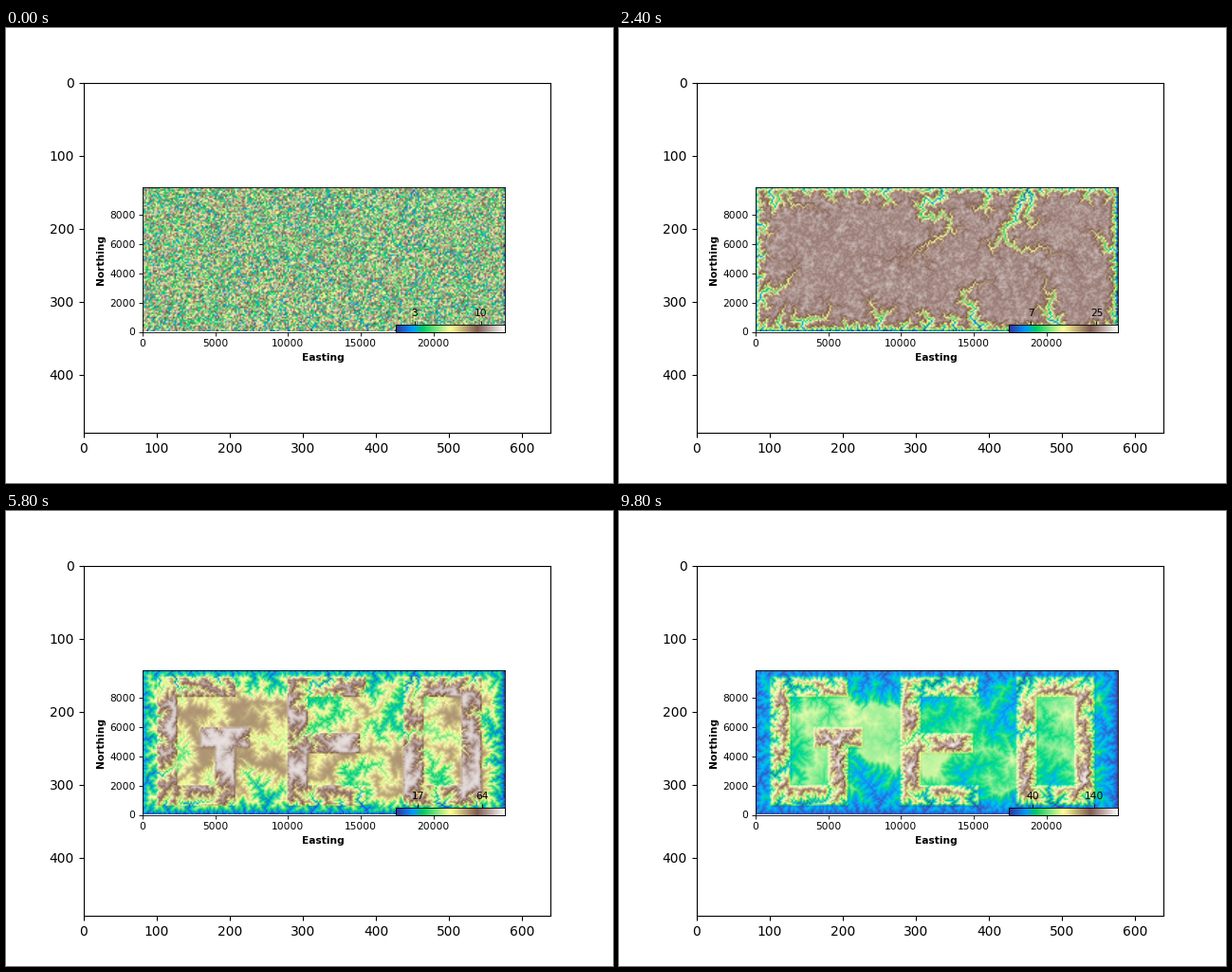
Recreate the animation shown at these times as a matplotlib script. Size 640 by 480 pixels, loop 10000 ms.

```python
import numpy as np
import matplotlib.pyplot as plt
from matplotlib.animation import FuncAnimation
from matplotlib.colors import LightSource

W, H, DPI = 640, 480, 100
ROWS, COLS, CELL = 100, 250, 100
FRAMES, SUBSTEPS = 50, 4
ERODE, UPLIFT, EXTRA, EXTRA_START = 0.17, 1.8, 4.1, 25
SCALE = 0.77
LOW = 1.0
STROKE, BOTTOM, TOP, WIDTH = 14, 6, 95, 54

NODES = np.arange(ROWS * COLS).reshape(ROWS, COLS)


def letter_mask():
    mask = np.zeros((ROWS, COLS), bool)

    def block(left, low, right, up):
        mask[low:up, left:right] = True

    for x in (10, 100, 180):
        block(x, BOTTOM, x + STROKE, TOP)
        block(x, BOTTOM, x + WIDTH, BOTTOM + STROKE)
        block(x, TOP - STROKE, x + WIDTH, TOP)
    block(40, 46, 74, 46 + STROKE)
    block(50, BOTTOM, 50 + STROKE, 60)
    block(100, 42, 150, 42 + STROKE)
    block(220, BOTTOM, 220 + STROKE, TOP)
    return mask


def fill_pits(z):
    """Raise closed hollows to their spill level with a tiny outward slope."""
    w = z.copy()
    inner, floor = w[1:-1, 1:-1], z[1:-1, 1:-1]
    inner[:] = 1e6
    while True:
        before = inner.copy()
        for _ in range(10):
            a = np.minimum(np.minimum(w[:-2], w[1:-1]), w[2:])
            a = np.minimum(np.minimum(a[:, :-2], a[:, 1:-1]), a[:, 2:]) + 1e-4
            np.minimum(inner, np.maximum(floor, a), out=inner)
        if np.array_equal(before, inner):
            return w


def receivers(w):
    """Steepest downhill neighbour of each node and the distance to it."""
    rec, dist = NODES.copy(), np.ones(w.shape)
    r, d = rec[1:-1, 1:-1], dist[1:-1, 1:-1]
    best = np.zeros(r.shape)
    for dy in (-1, 0, 1):
        for dx in (-1, 0, 1):
            if dx == dy == 0:
                continue
            length = np.hypot(dx, dy)
            part = (slice(1 + dy, ROWS - 1 + dy), slice(1 + dx, COLS - 1 + dx))
            slope = (w[1:-1, 1:-1] - w[part]) / length
            steeper = slope > best
            best[steeper] = slope[steeper]
            r[steeper] = NODES[part][steeper]
            d[steeper] = length
    return rec.ravel(), dist.ravel()


def flow_levels(rec):
    """Nodes grouped by their number of steps to the outlet."""
    depth = (rec != NODES.ravel()).astype(int)
    ahead = rec
    while True:
        more = depth[ahead]
        if not more.any():
            break
        depth = depth + more
        ahead = ahead[ahead]
    order = np.argsort(depth, kind="stable")
    cuts = np.searchsorted(depth[order], np.arange(1, depth.max() + 1))
    return np.split(order, cuts)[1:]


def evolve(z, lift):
    """Uplift and river erosion over one step, along one drainage network."""
    rec, dist = receivers(fill_pits(z))
    levels = flow_levels(rec)
    area = np.ones(z.size)
    for nodes in reversed(levels):
        np.add.at(area, rec[nodes], area[nodes])
    power = ERODE / SUBSTEPS * np.sqrt(area) / dist
    h = z.ravel().copy()
    for _ in range(SUBSTEPS):
        h += lift.ravel() / SUBSTEPS
        for nodes in levels:
            top, base, f = h[nodes], h[rec[nodes]], power[nodes]
            h[nodes] = np.where(top > base, (top + f * base) / (1 + f), top)
    return h.reshape(z.shape)


def high(n):
    """Top of the colour scale at step n."""
    return np.interp(n, [0, 7, 24, 41, 49], [12.5, 22.3, 51.2, 150, 178])


def simulate():
    letters = letter_mask()
    light = LightSource(azdeg=315, altdeg=65)
    z = LOW + 10 * np.random.default_rng(4).random((ROWS, COLS))
    lift = np.zeros(z.shape)
    lift[1:-1, 1:-1] = UPLIFT
    maps = []
    for n in range(FRAMES):
        z = evolve(z, lift + EXTRA * letters * (n >= EXTRA_START))
        maps.append(light.shade(z[::-1], cmap=plt.cm.terrain, vmin=LOW, vmax=high(n),
                                blend_mode="soft", dx=CELL, dy=CELL))
    return maps


def pixel_axes(left, top, width, height):
    return fig.add_axes([left / W, 1 - (top + height) / H, width / W, height / H])


def small_style(ax):
    ax.tick_params(length=3.5 * SCALE, width=0.8 * SCALE, pad=3.5 * SCALE,
                   labelsize=10 * SCALE)
    for spine in ax.spines.values():
        spine.set_linewidth(0.8 * SCALE)


maps = simulate()

fig = plt.figure(figsize=(W / DPI, H / DPI), dpi=DPI, facecolor="white")

outer = pixel_axes(81.6, 57.6, 492.8, 369.6)
outer.set(xlim=(-0.5, 639.5), ylim=(479.5, -0.5),
          xticks=range(0, 601, 100), yticks=range(0, 401, 100))

ax = pixel_axes(144.0, 168.0, 381.7, 152.5)
relief = ax.imshow(maps[0], aspect="auto", interpolation="bilinear",
                   extent=(0, 24900, 0, 9900))
ax.set(xticks=range(0, 20001, 5000), yticks=range(0, 8001, 2000))
small_style(ax)
ax.set_xlabel("Easting", fontweight="bold", fontsize=10 * SCALE, labelpad=4.6 * SCALE)
ax.set_ylabel("Northing", fontweight="bold", fontsize=10 * SCALE, labelpad=4 * SCALE)

bar = pixel_axes(411.2, 313.1, 114.5, 7.6)
bar.imshow(np.linspace(0, 1, 256)[None], cmap="terrain", aspect="auto",
           extent=(0, 1, 0, 1))
bar.set_yticks([])
bar.xaxis.tick_top()
small_style(bar)


def update(n):
    relief.set_data(maps[n])
    span = high(n) - LOW
    digits = -1 if high(n) > 100 else 0
    ticks = [round(LOW + part * span, digits) for part in (0.2, 0.8)]
    bar.set_xticks([(v - LOW) / span for v in ticks], [f"{v:.0f}" for v in ticks])
    return (relief,)


anim = FuncAnimation(fig, update, frames=FRAMES, interval=200, repeat=True,
                     repeat_delay=0, blit=False)
plt.show()
```
